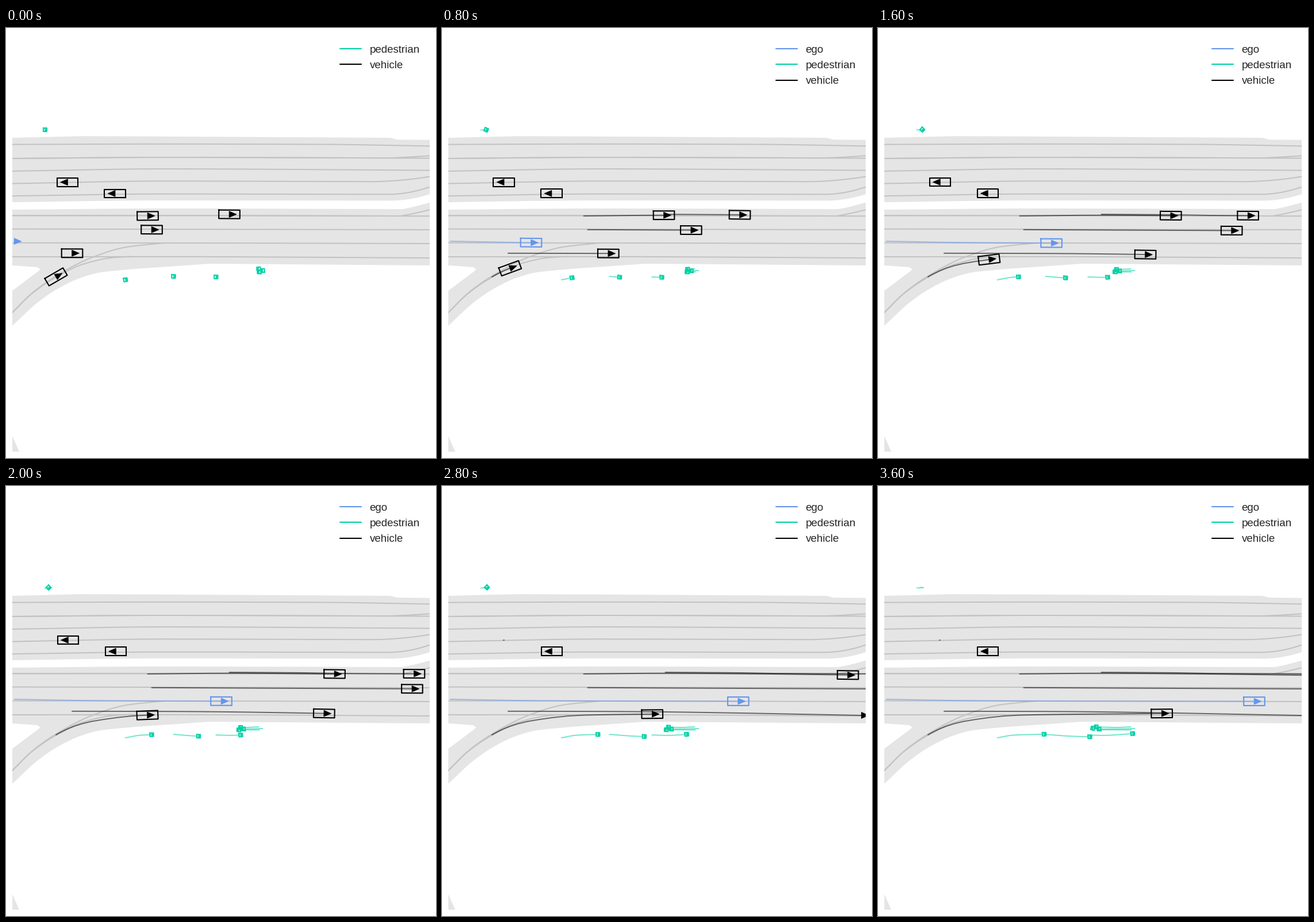
Write a matplotlib script that moves like this. It is 748 by 748 pixels and loops after 3.8 s.

```python
import numpy as np
import matplotlib.pyplot as plt
from matplotlib.animation import FuncAnimation

SIZE, DPI = 748, 100
LO, HI = 11, 737
FRAMES, STEP = 19, 200
PX = 72 / DPI

EGO, PED, CAR = "#6495ed", "#00d0a4", "#000000"
ROAD, LANE = "#e5e5e5", "#c2c2c2"

fig = plt.figure(figsize=(SIZE / DPI, SIZE / DPI), dpi=DPI, facecolor="white")
ax = fig.add_axes([LO / SIZE, LO / SIZE, (HI - LO) / SIZE, (HI - LO) / SIZE])
ax.set_xlim(LO, HI)
ax.set_ylim(HI, LO)
ax.axis("off")


def smooth(x, y, q):
    """Shape-preserving cubic through (x, y), evaluated at q."""
    x, y, q = (np.asarray(v, float) for v in (x, y, q))
    h = np.diff(x)
    d = np.diff(y) / h
    m = np.concatenate([d[:1], np.zeros(len(x) - 2), d[-1:]])
    for i in range(1, len(x) - 1):
        a, b = d[i - 1], d[i]
        if a * b > 0:
            u, v = 2 * h[i] + h[i - 1], h[i] + 2 * h[i - 1]
            m[i] = (u + v) / (u / a + v / b)
    i = np.clip(np.searchsorted(x, q, side="right") - 1, 0, len(h) - 1)
    s = (q - x[i]) / h[i]
    return (y[i] * (1 + 2 * s) * (1 - s) ** 2 + m[i] * h[i] * s * (1 - s) ** 2
            + y[i + 1] * s * s * (3 - 2 * s) - m[i + 1] * h[i] * s * s * (1 - s))


def curve(*pts):
    x, y = np.array(pts, float).T
    q = np.linspace(x[0], x[-1], 160)
    return np.column_stack([q, smooth(x, y, q)])


def track(left, mid, right, bend=0, start=640, power=2):
    """Line across the road that bends away from x = start to the right."""
    x = np.linspace(LO, HI, 400)
    flare = np.clip((x - start) / (HI - start), 0, 1) ** power
    y = smooth((LO, 270, HI), (left, mid, right), x) + bend * flare
    return np.column_stack([x, y])


def area(*edges):
    ax.add_patch(plt.Polygon(np.vstack(edges), fc=ROAD, ec="none", zorder=1))


def lane(line):
    ax.plot(*line.T, color=LANE, lw=2 * PX, zorder=2)


# Upper carriageway
area([(11, 191), (130, 188.2), (250, 188.6), (668, 191), (681, 194.2),
      (737, 194.7)],
     track(303, 299.9, 300.4, -11.4, 668)[::-1])
lane(track(202.6, 201.8, 203, 2.4, 560, 1.3))
lane(track(227, 225, 226.5))
lane(track(227, 225, 226.5, -4.2, 660, 1.3))
lane(track(249, 245.1, 247.6))
lane(track(270.6, 266.3, 267.8, -9.3, 625))
lane(track(292.2, 288.7, 289.6, -13.1, 662))

# Lower carriageway with its joining ramp
area(track(316, 314, 315.2, -11.7, 688, 1.25),
     [(737, 413), (355, 410), (230, 418.6)],
     curve((11, 518), (55, 477.5), (90, 453.5), (130, 434.5),
           (165, 425), (200, 421.2))[::-1],
     [(11, 457), (57, 422.5), (59.5, 419.5), (54, 416), (11, 413)])
lane(track(326.3, 326.2, 327.2))
lane(track(326.3, 326.2, 327.2, -11, 685, 1.2))
lane(track(349.6, 350, 351))
lane(track(373.7, 373.9, 375))
lane(track(398, 397.8, 400))
lane(curve((11, 495), (45, 461.5), (87, 431.5), (150, 399), (210, 381),
           (275, 374)))
lane(curve((11, 495), (45, 462), (87, 433.5), (135, 410.5), (187, 399.3),
           (220, 397.5)))
area([(11, 710), (23, 737), (11, 737)])

BOX = np.array([(-1, -1), (1, -1), (1, 1), (-1, 1), (-1, -1)], float)
HEAD = np.array([(0, -1), (1, 0), (0, 1)], float)
CAR_SHAPE = (BOX * (18.3, 7.4), HEAD * (12.8, 5.5) - (0.4, 0))
PED_SHAPE = (BOX * (3.1, 3), HEAD * (3, 2.6))


def route(*keys):
    """Drive along a curve through (step, x, y) keys, facing along it."""
    k, x, y = np.array(keys, float).T
    way = np.sign(x[-1] - x[0])
    px = smooth(k, x, np.arange(k[-1] + 1))
    py = smooth(way * x, y, way * px)
    turn = np.arctan(np.gradient(py, px)) + (np.pi if way < 0 else 0)
    return np.column_stack([px, py]), turn


class Agent:
    def __init__(self, color, shape, path, turn):
        self.path, self.shape = path, shape
        self.turn = np.broadcast_to(turn, len(path))
        self.trail, = ax.plot([], [], color=color, lw=2 * PX, alpha=0.55,
                              solid_capstyle="round", zorder=3)
        self.box, = ax.plot([], [], color=color, lw=2.1 * PX, zorder=4)
        self.head = plt.Polygon(np.zeros((3, 2)), fc=color, ec=color,
                                lw=0.7 * PX, zorder=5)
        ax.add_patch(self.head)

    def show(self, k):
        alive = k < len(self.path)
        j = min(k, len(self.path) - 1)
        self.trail.set_data(*self.path[:j + 1].T)
        c, s = np.cos(self.turn[j]), np.sin(self.turn[j])
        box, head = (p @ np.array([(c, s), (-s, c)]) + self.path[j]
                     for p in self.shape)
        self.box.set_data(*box.T)
        self.box.set_visible(alive and box.min() >= LO and box.max() <= HI)
        self.head.set_xy(head)
        self.head.set_visible(alive)


def car(*keys, color=CAR):
    return Agent(color, CAR_SHAPE, *route(*keys))


def walker(*keys):
    return Agent(PED, PED_SHAPE, *route(*keys))


def waiting(x, y, drift, steps):
    """Stopped car facing left that creeps by a pixel or so."""
    k = np.arange(steps)
    path = np.column_stack([x + drift * (1 - np.exp(-k / 4)), y - 0.02 * k])
    return Agent(CAR, CAR_SHAPE, path, np.pi)


def loiterer():
    """Pedestrian who strolls back and forth while turning."""
    k = np.arange(15)
    x = smooth((0, 6, 11, 12, 14), (67.7, 79, 73.5, 78, 78.2), k)
    turn = np.radians(np.minimum(5.5 * k, 45))
    return Agent(PED, PED_SHAPE, np.column_stack([x, 177.4 - 0.07 * k]), turn)


agents = [
    car((0, 14.5, 371), (4, 155, 373.3), (10, 374.5, 374.3),
        (18, 654.5, 374.6), color=EGO),
    waiting(107, 268.2, 1, 12),
    waiting(189.6, 287.9, 1.4, FRAMES),
    car((0, 246.5, 326.9), (4, 386, 325.7), (10, 571.5, 327),
        (15, 740, 329.2)),
    car((0, 253.5, 350.8), (4, 433.3, 351.6), (11, 752, 353)),
    car((0, 388.5, 324.1), (4, 518, 325), (6, 579, 326), (11, 743, 326.7)),
    car((0, 115, 391.8), (4, 289.3, 392.2), (15, 774, 399.7)),
    car((0, 87, 432.9), (1, 91.8, 430.1), (4, 118.4, 418), (6, 149, 409.5),
        (10, 246, 398.6), (18, 493.7, 395.7)),
    loiterer(),
    walker((0, 207.8, 438), (6, 235.5, 433.4), (18, 289, 431.8)),
    walker((0, 291.5, 432.1), (10, 335, 435.2), (18, 368.5, 436.3)),
    walker((0, 365.3, 433.1), (6, 391, 433.8), (18, 443, 430.8)),
    walker((0, 439.5, 419), (8, 414.8, 420), (18, 379.5, 419)),
    walker((0, 440.5, 424.3), (14, 390, 424), (18, 373.6, 421.4)),
    walker((0, 446.5, 421.9), (6, 426.8, 422.5), (18, 384.5, 422.8)),
]


def legend_row(color, label):
    line, = ax.plot([], [], color=color, lw=2.1 * PX,
                    solid_capstyle="round", zorder=6)
    text = ax.text(632.5, 0, label, family="Liberation Sans", fontsize=13.5,
                   color="#262626", va="baseline", zorder=6)
    return line, text


rows = [legend_row(EGO, "ego"), legend_row(PED, "pedestrian"),
        legend_row(CAR, "vehicle")]


def draw(k):
    for agent in agents:
        agent.show(k)
    shift = 1 if k == 0 else 0
    for i, (line, text) in enumerate(rows):
        y = 36.2 + 27.2 * (i - shift)
        line.set_data((581, 618), (y, y))
        text.set_y(y + 6.4)
        for item in (line, text):
            item.set_visible(i >= shift)
    return []


anim = FuncAnimation(fig, draw, frames=FRAMES, interval=STEP, repeat=True,
                     repeat_delay=0, init_func=lambda: draw(0))
plt.show()
```
